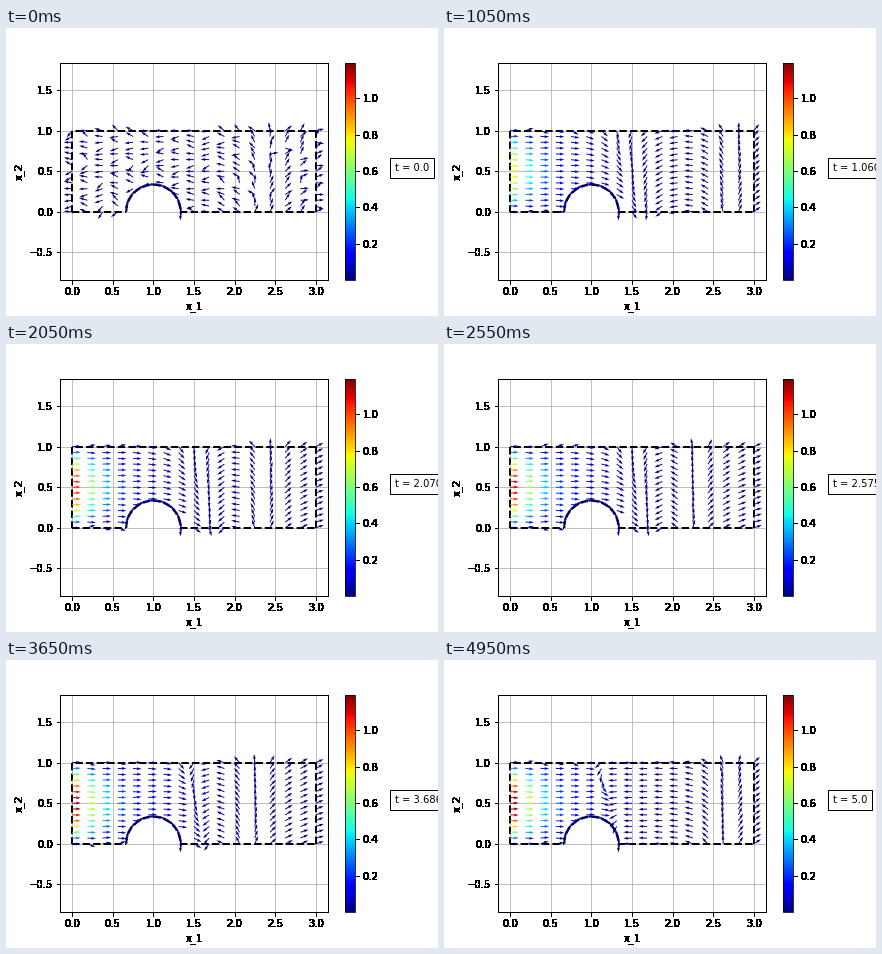
A matplotlib script for the animation above (5 s loop, 432x288 px).

```python
import numpy as np
import matplotlib.pyplot as plt
from matplotlib.animation import FuncAnimation

FRAMES = 100
TIMES = np.linspace(0, 5, FRAMES)
COLUMNS, ROWS = 17, 15
RADIUS = 1 / 3
PEAK = 1.2
ARROW = 8.6  # pixels

rng = np.random.default_rng(4)


def make_nodes():
    """Regular grid over the channel, without the bump."""
    x, y = np.meshgrid(np.linspace(0, 3, COLUMNS), np.linspace(0, 1, ROWS))
    x, y = x.ravel(), y.ravel()
    free = np.hypot(x - 1, y) > RADIUS + .02
    return x[free], y[free]


x, y = make_nodes()
noise = rng.normal(size=x.size)
phase = rng.uniform(0, 2 * np.pi, x.size)
wall = ((y == 0) | (y == 1)) & (x > 0) & (x < .8)

arc = np.linspace(np.pi, 0, 22)
arc_x, arc_y = 1 + RADIUS * np.cos(arc), RADIUS * np.sin(arc)
arc_angle = arc - np.pi / 2


def step(u):
    """Smooth rise from 0 to 1 around zero."""
    return .5 + .5 * np.tanh(u)


def direction(t):
    """Two fronts drift along the channel, each turning the flow clockwise."""
    start = np.exp(-t / .05)
    front = 1.15 + .55 * np.sin(np.pi * (t + .5) / 5.8) - 2 * start
    width = .4 - .33 * step(4 * (t - 3.6))
    far = 2.9 - .8 * np.sin(np.pi * t / 6.2) ** 2 - .6 * start

    lean = .25 * (y - .4) * np.clip((1.9 - x) / .5, 0, 1)
    angle = -180 * step((x + lean - front) / width)
    angle -= 160 * step((x - far) / .35)
    angle += 22 * (y - .5) * np.sin(np.radians(angle))
    angle += noise * (2 + 20 * start)
    angle += wall * 22 * np.sin(1.5 * t + phase)
    return np.radians(angle)


def speed(t):
    """Parabolic inflow that builds up in time and fades downstream."""
    profile = 4 * y * (1 - y)
    decay = .92 * np.exp(-x / .33) + .08 * np.exp(-x)
    return PEAK * (1 - np.exp(-t)) * profile * decay


def solid(img, dpi):
    """Make every touched pixel opaque."""
    img[..., 3] = img[..., 3] > 0
    return img, 0, 0


def harden(axis):
    for part in [axis.label, *axis.get_ticklabels(), *axis.get_ticklines()]:
        part.set_agg_filter(solid)


fig, ax = plt.subplots(figsize=(6, 4), dpi=72)
fig.subplots_adjust(left=.125, right=.9, bottom=.125, top=.88)

count = x.size + arc.size
quiver = ax.quiver(
    np.r_[x, arc_x], np.r_[y, arc_y], np.ones(count), np.zeros(count),
    np.zeros(count), cmap="jet", clim=(0, 1.197), zorder=3,
    units="dots", width=.95, scale_units="dots", scale=1 / ARROW)
bar = fig.colorbar(quiver, ax=ax)
bar.set_ticks(np.arange(.2, 1.1, .2))

edges = [
    ([0, 1 - RADIUS], [0, 0]),
    (arc_x, arc_y),
    ([1 + RADIUS, 3], [0, 0]),
    ([3, 3], [0, 1]),
    ([3, 0], [1, 1]),
    ([0, 0], [1, 0]),
]
for edge in edges:
    ax.plot(*edge, "k--", lw=2)

box = ax.get_window_extent()
half = 1.65 * box.height / box.width  # equal scale on both axes
ax.set_xlim(-.15, 3.15)
ax.set_ylim(.5 - half, .5 + half)
ax.set_xticks(np.arange(0, 3.1, .5))
ax.set_yticks(np.arange(-.5, 1.6, .5))
ax.grid(True)
ax.set_xlabel("x_1")
ax.set_ylabel("x_2")
for axis in (ax.xaxis, ax.yaxis, bar.ax.yaxis):
    harden(axis)
for spine in ax.spines.values():
    spine.set_agg_filter(solid)

clock = ax.text(1.25, .5, "", transform=ax.transAxes,
                bbox=dict(facecolor="w", pad=5))


def update(i):
    t = TIMES[i]
    angle = np.r_[direction(t), arc_angle]
    quiver.set_UVC(np.cos(angle), np.sin(angle),
                   np.r_[speed(t), np.zeros(arc.size)])
    clock.set_text(f"t = {t}")
    return quiver, clock


anim = FuncAnimation(fig, update, frames=FRAMES, interval=50,
                     repeat=True, repeat_delay=0, blit=False)
plt.show()
```
